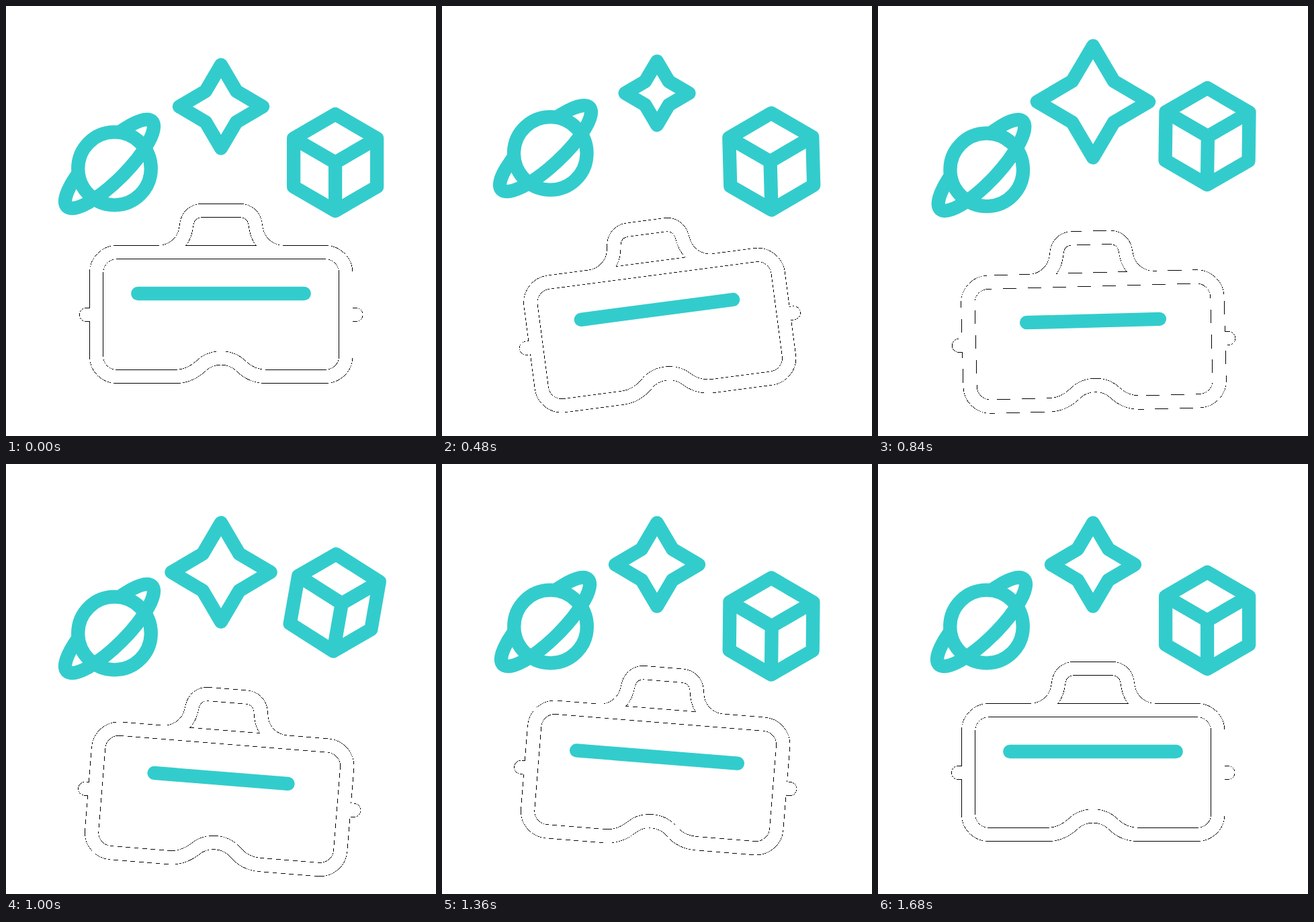
An HTML page for the animation above (1.72 s loop, 640 by 640 pixels).

```html
<!DOCTYPE html>
<html lang="en">
<head>
<meta charset="utf-8">
<title>VR headset</title>
<style>
html, body { margin: 0; width: 100%; height: 100%; overflow: hidden; background: #fff; }
svg { display: block; width: 100vw; height: 100vh; }
.teal { fill: none; stroke: #33cccc; stroke-width: 20.3; stroke-linecap: round; stroke-linejoin: round; }
.shell { fill: none; shape-rendering: crispEdges; }
.edge { stroke: #000; stroke-width: 20.9; }
.face { stroke: #fff; stroke-width: 19.8; }
.nub { stroke-linecap: round; }
</style>
</head>
<body>
<svg viewBox="0 0 640 640">
  <defs>
    <g id="frame">
      <path d="M165 366.5H475A30.8 30.5 0 0 1 505.8 397V521.55A30.8 30 0 0 1 475 551.55H388C373 551.55 360 546 350 536C342 528 331 524 320 524S298 528 290 536C279 546 267 551.55 252 551.55H165A30.45 30 0 0 1 134.55 521.55V397A30.45 30.5 0 0 1 165 366.5Z"/>
      <path d="M227 366.5C247 366.5 264 352 267.5 333L269 324C271 312 280 304.5 292 304.5H348C360 304.5 369 312 371 324L372.5 333C376 352 393 366.5 413 366.5"/>
      <path class="nub" d="M119.5 459.5H130M510 459.5H521"/>
    </g>
  </defs>
  <g id="headset">
    <use href="#frame" class="shell edge"/>
    <use href="#frame" class="shell face"/>
    <path id="bar" class="teal"/>
  </g>
  <g id="planet" class="teal">
    <path d="M-89.6 0A89.6 26 0 0 1 89.6 0" transform="rotate(-45)"/>
    <circle cx="7.5" cy="7" r="54.3" fill="#fff"/>
    <path d="M-89.6 0A89.6 26 0 0 0 89.6 0" transform="rotate(-45)"/>
  </g>
  <path id="star" class="teal"/>
  <path id="cube" class="teal"/>
</svg>
<script>
const LOOP = 1720, STEP = 40;
const el = id => document.getElementById(id);
const headset = el('headset'), bar = el('bar'), planet = el('planet'), star = el('star'), cube = el('cube');
let now = 0;

// Smooth 0 to 1 between two times.
function ease(from, to) {
  const s = Math.min(1, Math.max(0, (now - from) / (to - from)));
  return s * s * (3 - 2 * s);
}
// Up between a and b, held, back down between c and d.
const pulse = (a, b, c, d) => ease(a, b) - ease(c, d);
// Out to one extreme, across to the other, then home.
const swing = (first, second, a, b, c, d) =>
  first * pulse(a, b, b, c) + second * pulse(b, c, c, d);

const line = pts => 'M' + pts.map(p => p[0].toFixed(2) + ' ' + p[1].toFixed(2)).join('L');
const place = (node, x, y, tilt = 0) =>
  node.setAttribute('transform', `translate(${x} ${y}) rotate(${tilt})`);

function starPath(size) {
  const pts = [];
  for (let i = 0; i < 8; i++) {
    const r = size * (i % 2 ? 32.5 : 62), a = i * Math.PI / 4;
    pts.push([r * Math.sin(a), -r * Math.cos(a)]);
  }
  return line(pts) + 'Z';
}

// Isometric cube turned about its upright axis, narrowing a little as it turns.
function cubePath(degrees) {
  const yaw = degrees * Math.PI / 180;
  const corner = i => {
    const a = yaw + i * Math.PI / 2;
    return [62 * Math.cos(yaw) * Math.sin(a), -31 - 36 * Math.cos(a)];
  };
  const [back, right, front, left] = [0, 1, 2, 3].map(corner);
  const down = p => [p[0], p[1] + 72];
  return line([left, back, right, down(right), down(front), down(left)]) + 'Z' +
    line([left, front, right]) + line([front, down(front)]);
}

function draw() {
  const nod = 40.5 * pulse(225, 680, 960, 1520);
  const lean = -7.7 * pulse(100, 520, 680, 1000) + 4.6 * pulse(680, 1000, 1360, 1680);
  headset.setAttribute('transform', `translate(0 ${nod}) rotate(${lean} 320 428)`);
  const half = 123.75 - 24.75 * pulse(255, 785, 940, 1490);
  bar.setAttribute('d', line([[320 - half, 428], [320 + half, 428]]));

  place(planet, 154, 235 + swing(-23, 10, 40, 500, 1000, 1240), swing(6.5, -4, 40, 300, 700, 960));

  place(star, 320, 149.7 + swing(-30, 12.5, 260, 620, 1040, 1240));
  star.setAttribute('d', starPath(1 + swing(-0.26, 0.35, 205, 545, 800, 1220)));

  const tilt = swing(-11, 10, 430, 640, 1010, 1420);
  place(cube, 490.1, 228 + swing(-39, 9, 430, 840, 1320, 1600), tilt);
  cube.setAttribute('d', cubePath(-tilt));
}

const start = performance.now();
function tick() {
  const t = (performance.now() - start) % LOOP;
  now = Math.floor(t / STEP) * STEP;
  draw();
  requestAnimationFrame(tick);
}
tick();
</script>
</body>
</html>
```
